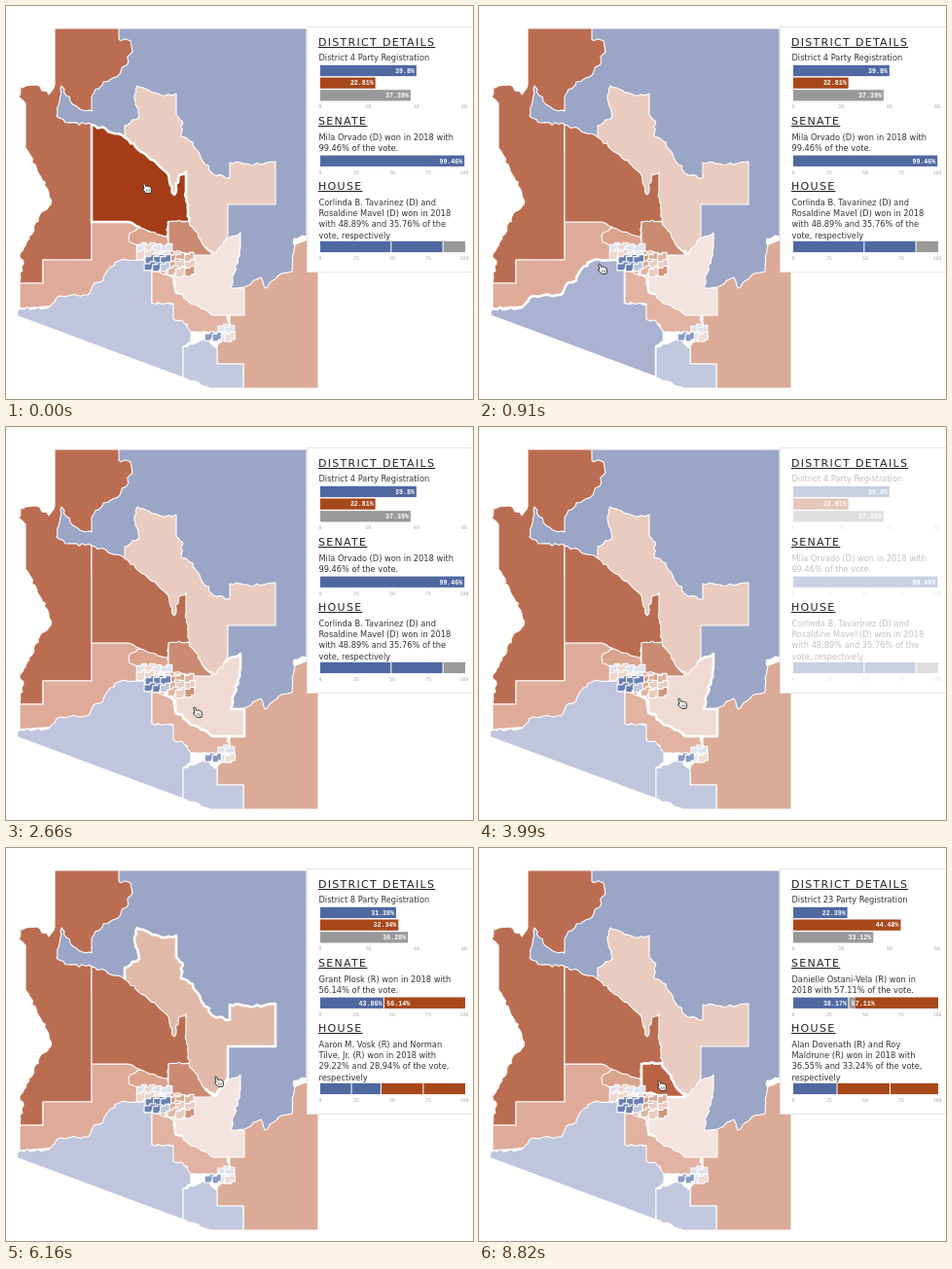
These frames come from a looping animation (480x404 px, 8.89 s). An HTML page:

```html
<!DOCTYPE html>
<html lang="en">
<head>
<meta charset="utf-8">
<title>District map</title>
<style>
html, body { margin: 0; width: 100%; height: 100%; overflow: hidden; background: #fff; }
svg { display: block; width: 480px; height: 404px; }
text { font-family: "DejaVu Sans", sans-serif; font-size: 8.25px; fill: #333; }
.head { font-size: 11px; letter-spacing: 1.3px; text-decoration: underline; fill: #222; }
.value { font: bold 6.6px "Liberation Mono", monospace; fill: #fff; }
.tick { font: 5px "DejaVu Sans Mono", monospace; fill: #aaa; text-anchor: middle; }
.end { text-anchor: end; }
#map path {
  fill: color-mix(in srgb, var(--color) 75%, white);
  stroke: #fff; stroke-width: 1.1; stroke-linejoin: round;
}
#map .over { fill: var(--color); stroke-width: 2.6; }
</style>
</head>
<body>
<svg id="stage" viewBox="0 0 480 404">
  <g id="map"></g>
  <rect x="309.5" y="21.5" width="176" height="252" fill="#fff" stroke="#e4e4e4"/>
  <text class="head" x="321" y="41">DISTRICT DETAILS</text>
  <text class="head" x="321" y="122">SENATE</text>
  <text class="head" x="321" y="189">HOUSE</text>
  <g id="panel"></g>
  <g id="cursor" fill="#fff" stroke="#222" stroke-width=".9" stroke-linejoin="round">
    <path d="M-3.2-4.6q1.2-1 1.9.3l1.2 3 .5-.6q1-.4 1.4.4 1-.6 1.6.3 1.2-.3 1.5.8l.6 2.4-.6 3.4h-4.8l-3.6-3.7q-.4-1.4 1.5-.7z"/>
    <path d="M.6 1.5v2.2M2 1.5v2.2M3.4 1.5v2.2" stroke-width=".5"/>
  </g>
</svg>
<script>
const LOOP = 8890;
const BLUE = '#4f68a0', RED = '#a8481a', GREY = '#999';
const $ = id => document.getElementById(id);

function add(parent, tag, attrs, text) {
  const node = document.createElementNS('http://www.w3.org/2000/svg', tag);
  for (const key in attrs) node.setAttribute(key, attrs[key]);
  if (text !== undefined) node.textContent = text;
  return parent.appendChild(node);
}

let seed = 11;
const random = () => (seed = seed * 16807 % 2147483647) / 2147483647;

// Slanted sides get a crinkled river-and-ridge edge; long ones are surveyed lines.
function crinkle(outline) {
  const points = outline.split(', ').map(pair => pair.split(' ').map(Number));
  const path = points.flatMap(([x, y], i) => {
    const [nx, ny] = points[(i + 1) % points.length];
    const dx = nx - x, dy = ny - y, length = Math.hypot(dx, dy);
    const parts = dx && dy && length < 60 ? Math.ceil(length / 4) : 1;
    return Array.from({ length: parts }, (_, p) => {
      const shift = () => p ? (random() - .5) * 3 : 0;
      return [(x + dx * p / parts + shift()).toFixed(1), (y + dy * p / parts + shift()).toFixed(1)];
    });
  });
  return 'M' + path.join('L') + 'Z';
}

const shapes = [];
function region(color, d) {
  const node = add($('map'), 'path', { d });
  node.style.setProperty('--color', color);
  shapes.unshift(node);
}

// Painted back to front, so each outline only needs the border it shows.
const districts = [
  ['#d08f76', '245 265, 321 236, 321 393, 244 393, 244 368, 217 368, 217 350, 230 340, 230 290'],
  ['#a43c18', '50 23, 130 23, 130 70, 88 130, 88 261, 38 261, 38 285, 14 285, 18 265, 14 255, 21 243, 35 214, 46 204, 44 192, 30 163, 20 146, 20 100, 13 94, 14 83, 32 81, 44 91, 50 81'],
  ['#7a87b2', '116 23, 309 23, 309 237, 296 239, 294 273, 283 275, 266 290, 262 279, 245 289, 231 290, 88 150, 88 122, 64 120, 52 113, 57 82, 66 98, 76 106, 88 108, 88 93, 100 78, 117 70, 130 47, 128 36, 116 34'],
  ['#d48f77', '88 222, 190 222, 190 270, 150 300, 14 311, 14 285, 38 285, 38 261, 88 261'],
  ['#aab1d1', '10 318, 14 311, 44 310, 55 298, 84 297, 90 286, 100 282, 104 272, 116 262, 141 260, 150 272, 150 305, 172 306, 190 335, 190 345, 182 350, 182 382'],
  ['#adb5d3', '182 350, 204 343, 217 352, 217 368, 244 368, 244 393, 210 393, 182 382'],
  ['#d89a83', '150 272, 172 278, 174 295, 228 318, 230 331, 218 336, 190 335, 181 323, 172 322, 172 306, 150 305'],
  ['#efdbd4', '241 233, 241 248, 231 290, 245 290, 245 318, 213 318, 188 304, 174 292, 174 282, 163 274, 182 274, 193 250, 215 250, 229 238'],
  ['#e1b9a9', '135 82, 160 92, 175 90, 175 112, 181 118, 180 134, 192 140, 200 156, 212 172, 230 177, 230 161, 255 163, 277 160, 277 204, 228 204, 228 236, 215 255, 180 230, 122 137, 122 123, 137 114, 132 95'],
  ['#a43c18', '88 122, 122 135, 146 155, 166 172, 173 194, 178 174, 185 170, 185 190, 188 222, 167 222, 166 237, 150 234, 126 222, 88 222'],
  ['#cf8468', '126 236, 136 228, 166 237, 167 250, 146 250, 127 243'],
  ['#ba6343', '167 222, 188 221, 190 226, 212 256, 193 256, 167 250']
];
for (const [color, outline] of districts) region(color, crinkle(outline));

// A patchwork of small stepped city districts.
function city(x, y, cols, rows, colors) {
  for (let i = 0; i < cols * rows; i++) {
    const left = x + i % cols * 8 + random() * 2, top = y + Math.floor(i / cols) * 7 + random() * 2;
    const w = 9 + random() * 3, h = 7 + random() * 2;
    region(colors[Math.floor(random() * colors.length)],
      `M${left} ${top}h${w / 2}v-2h${w / 2}v${h}h${-w / 3}v2H${left}z`);
  }
}
city(134, 245, 4, 2, ['#e8c8bc', '#d4dae9', '#ecd3ca']);
city(166, 255, 3, 3, ['#cf8a6c', '#c2714f', '#d79a80', '#e3bcae']);
city(142, 257, 3, 2, ['#38569a', '#6c82b6', '#aab4d4']);
city(216, 329, 2, 2, ['#e9d3cb', '#d4d9e8']);
city(203, 336, 2, 1, ['#5f78ad']);

const details = [
  { start: 0, fade: 3740, id: 4, party: [39.8, 22.81, 37.39],
    senate: ['Mila Orvado (D) won in 2018 with', '99.46% of the vote.'],
    votes: [99.46, 0],
    house: ['Corlinda B. Tavarinez (D) and', 'Rosaldine Mavel (D) won in 2018', 'with 48.89% and 35.76% of the', 'vote, respectively'],
    seats: [[48.89, BLUE], [35.76, BLUE], [15.35, GREY]] },
  { start: 4130, fade: 6330, id: 8, party: [31.38, 32.34, 36.28],
    senate: ['Grant Plosk (R) won in 2018 with', '56.14% of the vote.'],
    votes: [43.86, 56.14],
    house: ['Aaron M. Vosk (R) and Norman', 'Tilve, Jr. (R) won in 2018 with', '29.22% and 28.94% of the vote,', 'respectively'],
    seats: [[21.5, BLUE], [20.34, BLUE], [29.22, RED], [28.94, RED]] },
  { start: 6860, fade: 8010, id: 6, party: [29.09, 37.61, 33.31],
    senate: ['Marcia Ollun (R) won in 2018 with', '50.91% of the vote.'],
    votes: [49.09, 50.91],
    house: ['Wilmer Brockven (R) and Ned', 'Quorve (R) won in 2018 with', '26.45% and 25.93% of the vote,', 'respectively'],
    seats: [[25.5, BLUE], [22.12, BLUE], [26.45, RED], [25.93, RED]] },
  { start: 8610, fade: LOOP, id: 23, party: [22.39, 44.48, 33.12],
    senate: ['Danielle Ostani-Vela (R) won in', '2018 with 57.11% of the vote.'],
    votes: [38.17, 57.11],
    house: ['Alan Dovenath (R) and Roy', 'Maldrune (R) won in 2018 with', '36.55% and 33.24% of the vote,', 'respectively'],
    seats: [[30.21, BLUE], [36.55, RED], [33.24, RED]] }
];

const LEFT = 323, WIDTH = 149, RIGHT = LEFT + WIDTH;

function bar(g, x, y, width, fill) {
  add(g, 'rect', { x, y, width, height: 11.3, fill });
}
function axis(g, y, max, step) {
  for (let v = 0; v <= max; v += step) add(g, 'text', { class: 'tick', x: LEFT + v / max * (WIDTH - 1), y }, v);
}
function lines(g, y, rows) {
  rows.forEach((row, i) => add(g, 'text', { x: 321.5, y: y + i * 11.2 }, row));
}

for (const item of details) {
  const g = item.node = add($('panel'), 'g', {});
  lines(g, 56, [`District ${item.id} Party Registration`]);
  item.party.forEach((share, i) => {
    const w = share / 60 * WIDTH, y = 60.8 + i * 12.7;
    bar(g, LEFT, y, w, [BLUE, RED, GREY][i]);
    add(g, 'text', { class: 'value end', x: LEFT + w - 2, y: y + 7.8 }, share + '%');
  });
  axis(g, 105, 60, 20);

  lines(g, 137.5, item.senate);
  const [dem, rep] = item.votes, split = LEFT + dem * WIDTH / 100, repW = rep * WIDTH / 100;
  bar(g, LEFT, 153.6, split - LEFT, BLUE);
  if (rep) {
    bar(g, split, 153.6, RIGHT - split, GREY);
    bar(g, RIGHT - repW, 153.6, repW, RED);
    bar(g, split - .5, 153.6, 1, '#fff');
    add(g, 'text', { class: 'value', x: split + 3, y: 161.8 }, rep + '%');
  }
  add(g, 'text', { class: 'value end', x: split - 2, y: 161.8 }, dem + '%');
  axis(g, 172.5, 100, 25);

  lines(g, 205, item.house);
  let x = LEFT;
  for (const [share, fill] of item.seats) {
    const w = share * WIDTH / 100;
    bar(g, x, 241.8, w, fill);
    if (x > LEFT) bar(g, x - .5, 241.8, 1, '#fff');
    x += w;
  }
  axis(g, 260.5, 100, 25);
}

// Each pointer move: start, end, then the place reached.
const home = [144, 187];
const moves = [
  [70, 880, 126, 270], [2450, 2660, 196, 293], [2660, 2940, 208, 284],
  [4760, 5250, 218, 240], [6860, 7450, 187, 244]
];
const ramp = (t, from, to) => {
  const u = Math.min(1, Math.max(0, (t - from) / (to - from)));
  return u * u * (3 - 2 * u);
};
const pointer = t => moves.reduce(([x, y], [from, to, nx, ny]) => {
  const u = ramp(t, from, to);
  return [x + (nx - x) * u, y + (ny - y) * u];
}, home);

function draw() {
  const t = performance.now() % LOOP;
  const [x, y] = pointer(t);
  $('cursor').setAttribute('transform', `translate(${x} ${y})`);

  const tip = $('stage').createSVGPoint();
  tip.x = x - 3;
  tip.y = y - 5;
  const over = shapes.find(shape => shape.isPointInFill(tip));
  for (const shape of shapes) shape.classList.toggle('over', shape === over);

  const current = details.findLast(item => item.start <= t);
  for (const item of details) item.node.style.display = item === current ? '' : 'none';
  $('panel').setAttribute('opacity', 1 - .7 * ramp(t, current.fade, current.fade + 250));
  requestAnimationFrame(draw);
}
draw();
</script>
</body>
</html>
```
